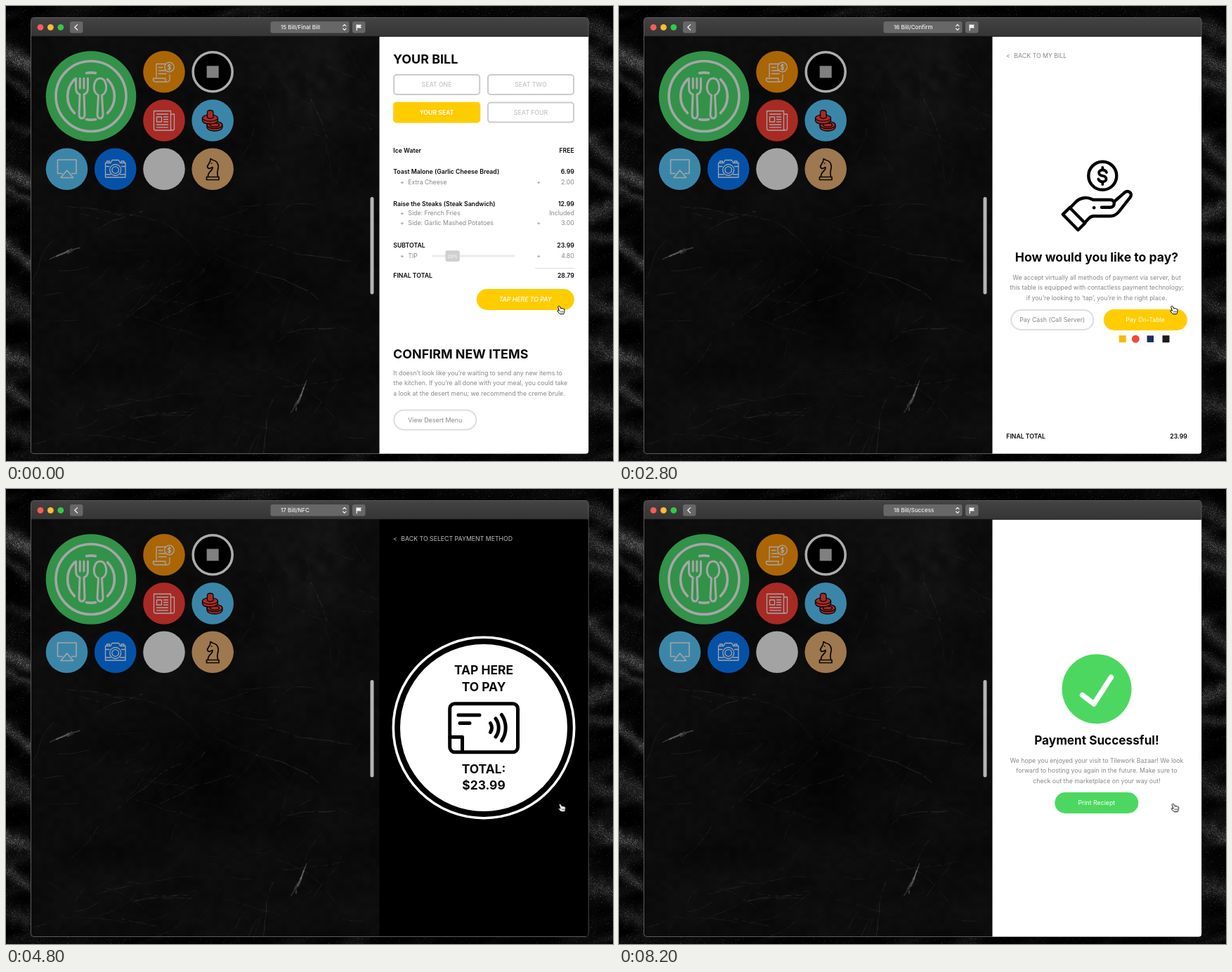
These frames come from a looping animation (864 by 648 pixels, 8.4 s). An HTML page with a canvas:

```html
<!DOCTYPE html>
<html lang="en">
<head>
<meta charset="utf-8">
<title>Table bill</title>
<style>
html, body { margin: 0; width: 100%; height: 100%; overflow: hidden; background: #000; }
canvas, svg { position: absolute; left: 0; top: 0; width: 864px; height: 648px; }
text { font: 8.75px Inter, "Open Sans", sans-serif; fill: #87878a; white-space: pre; }
.b { font-size: 8.7px; font-weight: 600; fill: #0a0a0a; }
.h { font-size: 17.9px; font-weight: 700; fill: #0a0a0a; }
.h.q { font-size: 17.6px; }
.h.d { font-size: 17.2px; }
.h.n { font-size: 17.4px; }
.seat { font-weight: 500; fill: #c4c4c8; }
.bar { font-size: 8px; font-weight: 500; fill: #f0f0f0; }
.w { fill: #fff; }
.c { text-anchor: middle; }
.e { text-anchor: end; }
.box { fill: #fff; stroke: #cbcbce; stroke-width: 2; }
.pill { fill: #fff; stroke: #dededf; stroke-width: 2; }
.gold { fill: #fc0; }
.line { fill: none; stroke: #a6a6a6; stroke-width: 1.3; stroke-linejoin: round; stroke-linecap: round; }
.ink { fill: none; stroke: #000; stroke-width: 4.4; stroke-linejoin: round; stroke-linecap: round; }
.s1, .s2, .s3, .s4, .t2, .t3 { animation: 8.4s step-end infinite; visibility: hidden; }
.s1 { animation-name: bill; }
.s2 { animation-name: confirm; }
.s3 { animation-name: nfc; }
.s4 { animation-name: done; }
.t2 { animation-name: confirmName; }
.t3 { animation-name: nfcName; }
@keyframes bill { 0% { visibility: visible } 30.94%, 100% { visibility: hidden } }
@keyframes confirm { 0% { visibility: hidden } 30.94% { visibility: visible } 57.13%, 100% { visibility: hidden } }
@keyframes nfc { 0% { visibility: hidden } 57.13% { visibility: visible } 76.18%, 100% { visibility: hidden } }
@keyframes done { 0% { visibility: hidden } 76.18%, 100% { visibility: visible } }
@keyframes confirmName { 0% { visibility: hidden } 30.94% { visibility: visible } 54.75%, 100% { visibility: hidden } }
@keyframes nfcName { 0% { visibility: hidden } 54.75% { visibility: visible } 76.18%, 100% { visibility: hidden } }
.hand { animation: move 8.4s infinite ease-in-out; }
@keyframes move { 0%, 42% { transform: none } 49%, 100% { transform: translate(1.5px, 21px) } }
</style>
</head>
<body>
<canvas id="stone" width="864" height="648"></canvas>
<svg viewBox="0 0 864 648">
  <defs>
    <linearGradient id="chrome" x2="0" y2="1"><stop stop-color="#434343"/><stop offset="1" stop-color="#353535"/></linearGradient>
  </defs>

  <!-- window -->
  <path d="M36 43V21q0-4 4-4H825q4 0 4 4V43Z" fill="url(#chrome)"/>
  <path d="M36 43.3H829" stroke="#111"/>
  <rect x="35.5" y="16.5" width="793.5" height="621" rx="4" fill="none" stroke="#5c5c5c"/>
  <circle cx="49" cy="30.3" r="4.4" fill="#fc5b57"/>
  <circle cx="63.4" cy="30.3" r="4.4" fill="#fdbc2f"/>
  <circle cx="77.8" cy="30.3" r="4.4" fill="#34c84a"/>
  <g fill="#676767">
    <rect x="91" y="22" width="18.5" height="16.5" rx="3"/>
    <rect x="376.5" y="22" width="112" height="16.5" rx="3"/>
    <rect x="493" y="22" width="18.5" height="16.5" rx="3"/>
  </g>
  <g fill="none" stroke="#f2f2f2" stroke-width="1.3" stroke-linecap="round" stroke-linejoin="round">
    <path d="M101.6 26.6 97.8 30.3 101.6 34"/>
    <path d="M479.6 28.6 481.8 26.3 484 28.6M479.6 32 481.8 34.3 484 32" stroke-width="1.1"/>
    <path d="M499.3 26.8V34.5"/>
    <path d="M499.5 27H505.5L504.3 29 505.5 31H499.5Z" fill="#f2f2f2" stroke-width=".8"/>
  </g>
  <text class="bar s1" x="391" y="33.2">15 Bill/Final Bill</text>
  <text class="bar t2" x="391" y="33.2">16 Bill/Confirm</text>
  <text class="bar t3" x="391" y="33.2">17 Bill/NFC</text>
  <text class="bar s4" x="391" y="33.2">18 Bill/Success</text>

  <!-- app icons -->
  <circle cx="121" cy="128.5" r="64.3" fill="#329249"/>
  <circle cx="225" cy="93.8" r="29.8" fill="#aa6505"/>
  <circle cx="294.2" cy="93.8" r="28" fill="#000" stroke="#acacac" stroke-width="3.6"/>
  <circle cx="225" cy="163" r="29.8" fill="#a82a24"/>
  <circle cx="294.2" cy="163" r="29.8" fill="#3b86a8"/>
  <circle cx="86.5" cy="232.2" r="29.8" fill="#3b86a8"/>
  <circle cx="155.7" cy="232.2" r="29.8" fill="#0452a8"/>
  <circle cx="225" cy="232.2" r="29.8" fill="#a3a3a3"/>
  <circle cx="294.2" cy="232.2" r="29.8" fill="#9e784e"/>
  <rect x="285.7" y="85.3" width="17" height="17" fill="#808080"/>

  <g class="line" stroke-width="3.6" style="stroke-width:3.6px">
    <circle cx="121" cy="128.5" r="50"/>
    <path d="M97.5 104.5A34 34 0 0 0 97.5 152.5M144.5 104.5A34 34 0 0 1 144.5 152.5M114.5 95.5A34 34 0 0 1 127.5 95.5M114.5 161.5A34 34 0 0 0 127.5 161.5" />
    <path d="M99.5 103V117Q99.5 124 105 126L104 155Q104.500 160 108 160T112 155L111 126Q116.500 124 116.500 117V103M105.300 103V117M110.900 103V117" stroke-width="3" style="stroke-width:3px"/>
    <path d="M134 103C127 103 124.500 112 125.500 119Q127 125 131.500 127L130 155Q130.500 160 134 160T138 155L136.500 127Q141 125 142.500 119C143.500 112 141 103 134 103Z" style="stroke-width:3px"/>
  </g>
  <g class="line">
    <path d="M214 101V82.500H227M233 98V104Q233 108 229 108H212Q209 107 209.500 103H227Q226 108 229.500 108M217.500 87.500H223M217.500 92H227M217.500 96.500H228M214 87.500h.5M214 92h.5M214 96.500h.5"/>
    <circle cx="232.500" cy="87" r="6.800"/>
    <path d="M234.600 84.500Q232.500 82.800 231 84.500T232.500 87 234 89.500 230.400 89.500M232.500 82.500V91.500"/>
    <path d="M210.500 149.500H234.500V174.500Q234.500 177 237 177T239.500 174.500V154H234.500M210.500 149.500V174.500Q210.500 177 213 177H237M214.500 154H230.500M214.500 158H221.500V165H214.500ZM224.500 158H230.500M224.500 161.500H230.500M224.500 165H230.500M214.500 169H230.500M214.500 172.800H230.500"/>
    <path d="M80 238.500H73.500V219H100V238.500H93.500M86.700 234 95.500 244.500H78Z" style="stroke-width:1.6px"/>
    <path d="M141.500 223.500H149L151 219.500H160.500L162.500 223.500H170V244H141.500ZM141.500 228.500H147M164.500 228.500H170M141.500 240H149M162.500 240H170M143.500 223V221H147.500V223M164 223V221H168V223"/>
    <circle cx="155.700" cy="233.500" r="8"/>
    <circle cx="155.700" cy="233.500" r="4.800"/>
  </g>
  <g fill="#a82a24" stroke="#080808" stroke-width="1.300" stroke-linejoin="round">
    <path d="M286 169.500V173Q288 178 297 178T308 173V169.500"/>
    <ellipse cx="297" cy="169.500" rx="11" ry="5"/>
    <ellipse cx="297" cy="169.500" rx="6.500" ry="2.600"/>
    <path d="M279.500 159.500V163.500Q281 168 290 168T301.500 163.500V159.500Z"/>
    <ellipse cx="290.500" cy="159.500" rx="11" ry="4.600"/>
    <path d="M286.500 159V152Q286 148.500 290.500 148.500T295 152V159Q290.500 161.500 286.500 159Z"/>
  </g>
  <g fill="none" stroke="#0b0805" stroke-width="1.700" stroke-linejoin="round" stroke-linecap="round">
    <path d="M285.500 247.500V243.500H303V247.500ZM287.500 243Q287.500 238.500 291 235.500 294.500 232.500 294 229.500L290 231.500Q287 231.500 286.500 228.500L290.500 221.500 291 217.500 294.500 219.500C301 220.500 303.500 227 301.500 233Q300 238.500 301.500 243"/>
    <path d="M292.500 224h.3"/>
  </g>
  <rect x="518.500" y="272" width="5" height="138.500" rx="2.500" fill="#b5b5b5"/>

  <!-- bill -->
  <g class="s1">
    <path d="M531.500 43.700H829V634Q829 637.500 825.500 637.500H531.500Z" fill="#fff"/>
    <text class="h" x="551" y="81.600">YOUR BILL</text>
    <rect class="box" x="552.200" y="98" width="122" height="28" rx="4"/>
    <rect class="box" x="686" y="98" width="122" height="28" rx="4"/>
    <rect class="gold" x="551.200" y="136.800" width="124" height="29.600" rx="4.500"/>
    <rect class="box" x="686" y="137.600" width="122" height="28" rx="4"/>
    <text class="seat c" x="613" y="115.200">SEAT ONE</text>
    <text class="seat c" x="747" y="115.200">SEAT TWO</text>
    <text class="b c" x="613" y="154.600" style="fill:#fff">YOUR SEAT</text>
    <text class="seat c" x="747" y="154.600">SEAT FOUR</text>

    <g class="left">
      <text class="b" x="551.300" y="209.200">Ice Water</text>
      <text class="b" x="551.300" y="239.200">Toast Malone (Garlic Cheese Bread)</text>
      <text x="561" y="253.800">+</text><text x="572.300" y="253.800">Extra Cheese</text>
      <text class="b" x="551.300" y="284.600">Raise the Steaks (Steak Sandwich)</text>
      <text x="561" y="298">+</text><text x="572.300" y="298">Side: French Fries</text>
      <text x="561" y="311.600">+</text><text x="572.300" y="311.600">Side: Garlic Mashed Potatoes</text>
      <text class="b" x="551.300" y="344">SUBTOTAL</text>
      <text x="561" y="359.400">+</text><text x="572.300" y="359.400">TIP</text>
      <text class="b" x="551.300" y="387.200">FINAL TOTAL</text>
    </g>
    <g>
      <text class="b e" x="808.800" y="209.200">FREE</text>
      <text class="b e" x="808.800" y="239.200">6.99</text>
      <text x="755.300" y="253.800">+</text><text class="e" x="808.800" y="253.800">2.00</text>
      <text class="b e" x="808.800" y="284.600">12.99</text>
      <text class="e" x="808.800" y="298">Included</text>
      <text x="755.300" y="311.600">+</text><text class="e" x="808.800" y="311.600">3.00</text>
      <text class="b e" x="808.800" y="344">23.99</text>
      <text x="755.300" y="359.400">+</text><text class="e" x="808.800" y="359.400">4.80</text>
      <text class="b e" x="808.800" y="387.200">28.79</text>
    </g>
    <path d="M608 356H723" stroke="#ededee" stroke-width="3.500" stroke-linecap="round"/>
    <rect x="625.500" y="348.300" width="20.300" height="15.600" rx="3" fill="#cfcfd2"/>
    <text class="w c" x="635.700" y="358.500" style="font-size:6.800px">20%</text>
    <path d="M753 373.700H809" stroke="#e2e2e4" stroke-width="1.300"/>
    <rect class="gold" x="669.800" y="403" width="139" height="30" rx="15"/>
    <text class="w c" x="739.300" y="421.200" style="font-style:italic;font-weight:500">TAP HERE TO PAY</text>
    <text class="h" x="551" y="502.400">CONFIRM NEW ITEMS</text>
    <text x="551.300" y="526">It doesn’t look like you’re waiting to send any new items to</text>
    <text x="551.300" y="540.400">the kitchen. If you’re all done with your meal, you could take</text>
    <text x="551.300" y="554.700">a look at the desert menu; we recommend the creme brule.</text>
    <rect class="pill" x="552.300" y="575.400" width="117" height="28" rx="14"/>
    <text class="c" x="610.700" y="592.600" style="font-size:8.900px">View Desert Menu</text>
  </g>

  <!-- payment choice -->
  <g class="s2">
    <path d="M531.500 43.700H829V634Q829 637.500 825.500 637.500H531.500Z" fill="#fff"/>
    <text x="551" y="74.200">&lt;</text>
    <text x="562.300" y="74.200">BACK TO MY BILL</text>
    <g class="ink">
      <circle cx="688.300" cy="241.800" r="20"/>
      <path d="M694 237Q692.500 233.500 688.300 233.500C681.500 233.500 681.500 241 688.300 241.800 695.500 242.800 695 250.300 688.300 250.300Q683.700 250.300 682.300 246.500M688.300 230V233M688.300 251V254" style="stroke-width:3.800px"/>
      <path d="M631.700 296.800 641.700 287.200 663.300 309.300 653.500 319Z"/>
      <path d="M642.500 287 650 279.300C656 273.200 665 271.500 672 274.700L675 276H699.500C706.500 276 706.500 286.500 699.500 286.700H687"/>
      <path d="M705 278.500 719.500 265.800C725 261.500 731.500 266.500 727.700 272.300L711.500 293Q706.500 299.300 699 299.300H676Q671.500 299.300 668.500 302.800L663 308.500"/>
      <path d="M676 287.200h.3"/>
    </g>
    <text class="h q c" x="680" y="364.200">How would you like to pay?</text>
    <text class="c" x="680" y="390">We accept virtually all methods of payment via server, but</text>
    <text class="c" x="680" y="404.400">this table is equipped with contactless payment technology;</text>
    <text class="c" x="680" y="418.700">if you’re looking to ‘tap’, you’re in the right place.</text>
    <rect class="pill" x="558.300" y="433" width="117" height="28" rx="14"/>
    <text class="c" x="616.700" y="450.300">Pay Cash (Call Server)</text>
    <rect class="gold" x="689.800" y="432" width="119" height="30" rx="15"/>
    <text class="w c" x="749" y="450">Pay On-Table</text>
    <rect x="711.700" y="469.200" width="10" height="10" fill="#f5b912"/>
    <circle cx="735.300" cy="474.200" r="5.500" fill="#ee4a3c"/>
    <rect x="751.500" y="469.400" width="9.500" height="9.500" fill="#1f2c5c"/>
    <rect x="773.500" y="469.200" width="10" height="10" fill="#1c1c1c"/>
    <text class="b" x="551.300" y="616.200">FINAL TOTAL</text>
    <text class="b e" x="808.800" y="616.200">23.99</text>
  </g>

  <!-- tap card -->
  <g class="s3">
    <path d="M531.500 43.700H828.500V634Q828.500 637 825.500 637H531.500Z" fill="#000"/>
    <text x="551" y="74.200" style="fill:#bdbdbd">&lt;</text>
    <text x="562.300" y="74.200" style="fill:#bdbdbd">BACK TO SELECT PAYMENT METHOD</text>
    <circle cx="680" cy="340" r="128.700" fill="none" stroke="#fff" stroke-width="3.600"/>
    <circle cx="680" cy="340" r="119" fill="#fff"/>
    <text class="h n c" x="680" y="264.200">TAP HERE</text>
    <text class="h n c" x="680" y="287.600">TO PAY</text>
    <g class="ink" style="stroke-width:5px">
      <rect x="631.700" y="305.800" width="96.800" height="69" rx="7"/>
      <path d="M632 353.300H649.500V374.500M644 322H674M646 333.500H660"/>
      <path d="M689.500 333.500A12 12 0 0 1 689.500 346.500M697 327A22 22 0 0 1 697 353M705.500 321.500A33 33 0 0 1 705.500 358.500"/>
    </g>
    <text class="h n c" x="680" y="404.600">TOTAL:</text>
    <text class="h n c" x="680" y="427.600">$23.99</text>
  </g>

  <!-- success -->
  <g class="s4">
    <path d="M531.500 43.700H829V634Q829 637.500 825.500 637.500H531.500Z" fill="#fff"/>
    <circle cx="680" cy="284.800" r="49.500" fill="#4cd860"/>
    <path d="M659.500 293.500 676 306 700.500 268" fill="none" stroke="#fff" stroke-width="7.400" stroke-linecap="round" stroke-linejoin="round"/>
    <text class="h d c" x="680" y="364.200">Payment Successful!</text>
    <text class="c" x="680" y="390">We hope you enjoyed your visit to Tilework Bazaar! We look</text>
    <text class="c" x="680" y="404.400">forward to hosting you again in the future. Make sure to</text>
    <text class="c" x="680" y="418.700">check out the marketplace on your way out!</text>
    <rect x="620.300" y="432" width="119" height="30" rx="15" fill="#4cd860"/>
    <text class="w c" x="679.800" y="450">Print Reciept</text>
  </g>

  <g class="hand">
    <path d="M786.300 427.700Q787.500 426.800 788.300 428L789.800 430.900Q791 430 791.800 431 793 430.200 793.600 431.400 795 431 795 433L794.700 436.500 793.600 438.700H788.600L784.900 434.900Q784.700 433.300 786.300 433.600L787.500 434.300 785.800 429Q785.600 428.200 786.300 427.700Z" fill="#fff" stroke="#000" stroke-width="1"/>
    <path d="M789.700 434.300V436.700M791.300 434.300V436.700M792.900 434.300V436.700" stroke="#000" stroke-width=".6"/>
  </g>
</svg>
<script>
const ctx = document.getElementById('stone').getContext('2d');
const W = 864, H = 648;
const hash = (x, y) => {
  const h = Math.sin(x * 127.1 + y * 311.7) * 43758.5453;
  return h - Math.floor(h);
};
const ease = t => t * t * (3 - 2 * t);
const mix = (a, b, t) => a + (b - a) * t;
function noise(x, y) {
  const i = Math.floor(x), j = Math.floor(y), u = ease(x - i), v = ease(y - j);
  return mix(mix(hash(i, j), hash(i + 1, j), u), mix(hash(i, j + 1), hash(i + 1, j + 1), u), v);
}

// sand ridges beside the window: y, slope, half width, level
const leftRidges = [[68, .6, 14, 75], [105, .7, 9, 40], [170, .4, 7, 25], [238, .5, 9, 75], [264, .5, 8, 50],
  [345, .8, 10, 65], [420, .5, 14, 50], [500, .4, 10, 60], [545, .7, 9, 50], [605, .5, 12, 35]];
const rightRidges = [[30, .5, 12, 45], [75, .5, 12, 55], [110, .3, 12, 55], [195, .8, 14, 55], [240, .6, 10, 45],
  [300, -.3, 12, 60], [330, .2, 8, 40], [420, .5, 14, 40], [485, .4, 12, 45], [565, .4, 16, 40]];

function sand(x, y) {
  const left = x < W / 2, dx = left ? x : x - 829;
  let level = 30 * noise(x / 45, y / 14 + x / 60) ** 2;
  if (x < 40 || x > 825)
    for (const [y0, slope, w, top] of left ? leftRidges : rightRidges)
      level += top * Math.exp(-(((y - y0 - slope * dx + 8 * noise(x / 9, y / 20)) / w) ** 2));
  const grain = hash(x + 3, y + 7);
  return level * (.4 + .8 * grain * grain) + (grain > .985 ? 30 : 0);
}
function marble(x, y) {
  const glow = 9 * Math.exp(-(((x - 435) / 75) ** 2 + ((y - 100) / 80) ** 2));
  const dark = 5 * Math.exp(-(((x - 260) / 110) ** 2 + ((y - 400) / 120) ** 2));
  return 7 + 6 * noise(x / 50, y / 40) + 4 * noise(x / 9, y / 8) + glow * noise(x / 14, y / 14) - dark;
}
const img = ctx.createImageData(W, H);
for (let y = 0, p = 0; y < H; y++)
  for (let x = 0; x < W; x++, p += 4) {
    const inside = x > 35 && x < 829 && y > 16 && y < 638;
    const v = inside ? (x < 532 ? marble(x, y) : 0) : sand(x, y);
    img.data[p] = img.data[p + 1] = img.data[p + 2] = v;
    img.data[p + 3] = 255;
  }
ctx.putImageData(img, 0, 0);

let seed = 41;
const rnd = () => (seed = seed * 16807 % 2147483647) / 2147483647;
function vein(x, y, angle, len, alpha, width = .7) {
  ctx.strokeStyle = `rgba(190,190,190,${alpha})`;
  for (let d = 0; d < len; d += 5) {
    ctx.lineWidth = width * (.4 + rnd());
    ctx.beginPath();
    ctx.moveTo(x, y);
    angle += (rnd() - .5) * .3;
    x += 5 * Math.cos(angle);
    y += 5 * Math.sin(angle);
    ctx.lineTo(x, y);
    if (rnd() > .12) ctx.stroke();
  }
}
ctx.beginPath();
ctx.rect(36, 44, 495, 593);
ctx.clip();
for (let i = 0; i < 85; i++)
  vein(40 + rnd() * 480, 270 + rnd() * 350, rnd() < .55 ? rnd() * .6 - .2 : 2 + rnd() * .7, 20 + rnd() * 90, .04 + rnd() * .11);
for (let i = 0; i < 25; i++)
  vein(330 + rnd() * 190, 45 + rnd() * 220, .3 + rnd() * 1.4, 15 + rnd() * 60, .03 + rnd() * .08);
// the brightest scratches
for (let i = 0; i < 6; i++) {
  vein(62 + i * 5, 361 - i * 2, -.4, 22, .25, 1.4);
  vein(428 - i * 2, 533 + i * 5, 1.9, 22, .24, 1.6);
}
vein(345, 378, .08, 110, .22);
vein(375, 340, .1, 120, .2);
vein(130, 318, -.5, 70, .2);
vein(160, 455, -.75, 110, .18);
vein(425, 120, .9, 75, .2);
vein(400, 465, -.1, 70, .2);
vein(380, 560, 1.9, 80, .18);
</script>
</body>
</html>
```
